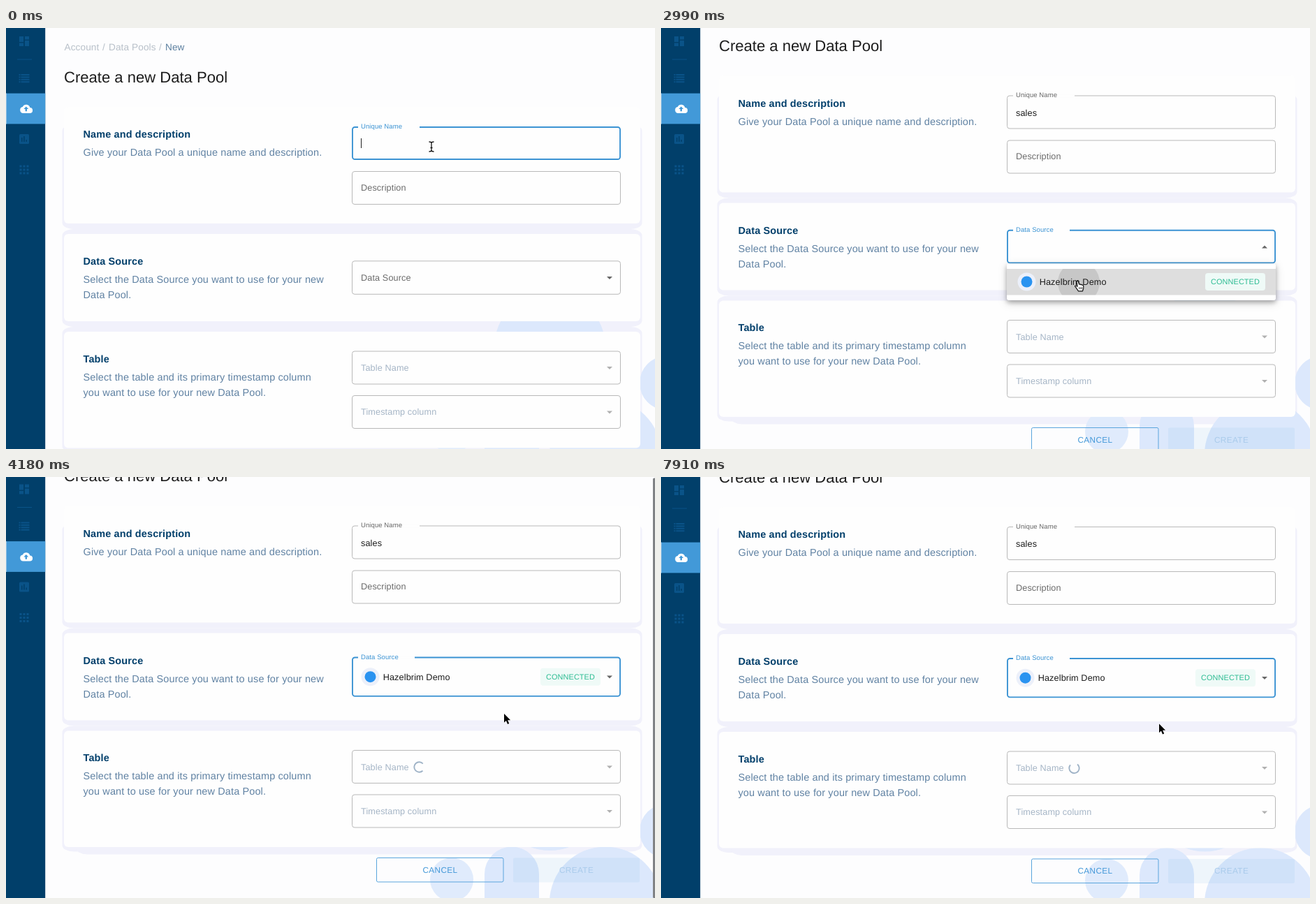
An HTML page that plays this animation: 929x603 px, repeating every 8000 ms.

```html
<!DOCTYPE html>
<html lang="en">
<head>
<meta charset="utf-8">
<title>Create a new Data Pool</title>
<style>
html, body { margin: 0; width: 100%; height: 100%; overflow: hidden; background: #fdfdfe; }
svg { display: block; }
text {
  font: 12.67px "Liberation Sans", Arial, sans-serif; letter-spacing: .12px; fill: #1c1c1c;
  text-rendering: geometricPrecision;
}
.crumb { font-size: 13.58px; fill: #b8c0c9; }
.here { fill: #5b7f9f; }
.title { font-size: 22.05px; letter-spacing: 0; }
.head { font-size: 14.46px; font-weight: bold; letter-spacing: .136px; fill: #023f6b; }
.body { font-size: 14.46px; letter-spacing: .136px; fill: #6082a3; }
.hint { fill: #6b6b6b; }
.off { fill: #a5b5c6; }
.label { font-size: 9.5px; letter-spacing: .09px; fill: #666; }
.active { fill: #3b93d3; }
.chip { font-size: 10.86px; letter-spacing: .13px; fill: #2cbc92; text-anchor: middle; }
.button { font-size: 11.77px; letter-spacing: .4px; fill: #4398d8; text-anchor: middle; }
.disabled { fill: #a9cbeb; }
.menu { filter: drop-shadow(0 3px 3px rgba(0, 0, 0, .25)) drop-shadow(0 3px 6px rgba(0, 0, 0, .18)); }
</style>
</head>
<body>
<svg id="stage" width="929" height="603" viewBox="0 0 929 603"></svg>
<script>
const LOOP = 8000, STEP = 149.2, MAX_SCROLL = 70;
const BLUE = '#3b93d3', GRAY = '#b9b9b9', SHADE = '#f1f1fb', BUBBLE = '#dce8fc';
const SOURCE = 'Hazelbrim Demo';

// Keys are [step, value, ...]
const SCROLL = [[10, 0], [11, 14], [12, 36], [13, 44.5], [23, 44.5], [24, 45.5],
  [25, 71.5], [26, 73], [27, 72.5], [28, 71.5], [29, 70.6], [30, 70]];
const POINTER = [[6, 609, 170], [9, 652, 322], [17, 652, 322], [20, 596, 362],
  [21, 596, 362], [23, 702, 336], [24, 712, 341], [25, 713, 339], [28, 713, 339], [32, 713, 353.5]];

function at(keys, k) {
  if (k <= keys[0][0]) return keys[0].slice(1);
  for (let i = 1; i < keys.length; i++) {
    const a = keys[i - 1], b = keys[i];
    if (k <= b[0]) return a.slice(1).map((v, j) => v + (b[j + 1] - v) * (k - a[0]) / (b[0] - a[0]));
  }
  return keys[keys.length - 1].slice(1);
}

const text = (x, y, str, cls = '') => `<text x="${x}" y="${y}" class="${cls}">${str}</text>`;
const rect = (x, y, w, h, fill, r = 0, more = '') =>
  `<rect x="${x}" y="${y}" width="${w}" height="${h}" rx="${r}" fill="${fill}" ${more}/>`;
const circle = (x, y, r, fill, more = '') => `<circle cx="${x}" cy="${y}" r="${r}" fill="${fill}" ${more}/>`;
const path = (d, fill, more = '') => `<path d="${d}" fill="${fill}" ${more}/>`;
const move = (x, y, content) => `<g transform="translate(${x} ${y})">${content}</g>`;

function sidebar() {
  const ink = '#0a5388';
  let s = rect(0, -10, 56.2, 640, '#013f6a') + rect(0, 93.6, 56.2, 43.8, '#4299d8') + rect(0, 93.6, 1, 43.8, '#8fc0e4');
  s += rect(19, 12, 6, 8, ink) + rect(19, 21.5, 6, 4.5, ink) + rect(27, 12, 6, 4.5, ink) + rect(27, 18, 6, 8, ink);
  s += rect(16, 44.5, 21, 1, ink);
  for (let i = 0; i < 4; i++) s += rect(18.5, 66 + i * 3.4, 2, 2, ink) + rect(21.5, 66 + i * 3.4, 12, 2, ink);
  s += rect(19, 152, 14, 14, ink, 1.5);
  [[22, 157, 6], [25.2, 155, 8], [28.5, 160, 3]].forEach(([x, y, h]) => s += rect(x, y, 1.5, h, '#013f6a'));
  for (let i = 0; i < 9; i++) s += rect(19.5 + i % 3 * 5, 196.5 + (i / 3 | 0) * 5, 3, 3, ink);
  s += path('M24.5 122a4.6 4.6 0 0 1-.6-9.1a5.6 5.6 0 0 1 10.4 1.1a4 4 0 0 1-.4 8z', '#fff');
  return s + path('M28.8 112.5l3.4 3.6h-2.2v3.2h-2.4v-3.2h-2.2z', '#4299d8');
}

function bubbles() {
  return circle(778.5, 457, 79.5, BUBBLE) + circle(946, 508.5, 39, BUBBLE) + circle(858, 611, 80, BUBBLE) +
    circle(638, 578, 31, '#e0ebfc') + rect(685, 531, 78, 120, BUBBLE, 39);
}

function field(y, h, focus, gap) {
  const w = focus ? 1.9 : 1;
  return rect(495 + w / 2, y + w / 2, 385 - w, h - w, 'none', 3.5, `stroke="${focus ? BLUE : GRAY}" stroke-width="${w}"`) +
    (gap ? rect(504, y - 1, gap, 4, '#fefefe') : '');
}

const arrow = (y, fill, up) => path(up ? `M860 ${y + 2}h8l-4-4z` : `M860 ${y - 2}h8l-4 4z`, fill);

const sourceItem = (iconX, textX, chipX, y) =>
  circle(iconX, y, 13, '#ecf0fa') + circle(iconX, y, 8, '#2a93f0') + text(textX, y + 4.5, SOURCE) +
  rect(chipX, y - 12.5, 86, 25, '#effaf7', 4) + text(chipX + 43, y + 3.7, 'CONNECTED', 'chip');

// Wide soft corners meet between the cards and leave a notch at each side
function shadows() {
  const shade = (x, y, w, h) => rect(x, y, w, h, SHADE, 16, 'ry="9"');
  return shade(80.5, 138, 830, 150) + shade(80.5, 288, 830, 140) + shade(80.5, 428, 830, 180) + shade(100, 590, 790, 22);
}

function page(k, time) {
  const open = k >= 17 && k < 21, chosen = k >= 21, nameFocus = k < 17;
  let s = text(83.5, 32, 'Account', 'crumb') + text(138, 32, '/', 'crumb') + text(147, 32, 'Data Pools', 'crumb') +
    text(219, 32, '/', 'crumb') + text(228, 32, 'New', 'crumb here') + text(83, 77.5, 'Create a new Data Pool', 'title');
  s += rect(83, 113, 825, 167, '#fefefe', 6) + rect(83, 295, 825, 125, '#fefefe', 6) + rect(83, 435, 825, 166.5, '#fefefe', 6);

  s += text(110.5, 157, 'Name and description', 'head') +
    text(110.5, 183, 'Give your Data Pool a unique name and description.', 'body') +
    text(110.5, 339, 'Data Source', 'head') +
    text(110.5, 365, 'Select the Data Source you want to use for your new', 'body') +
    text(110.5, 387, 'Data Pool.', 'body') +
    text(110.5, 478.5, 'Table', 'head') +
    text(110.5, 504.5, 'Select the table and its primary timestamp column', 'body') +
    text(110.5, 526.5, 'you want to use for your new Data Pool.', 'body');

  // Name, with typing and caret
  const typed = 'sales'.slice(0, Math.max(0, k - 3));
  const caretX = 508 + [0, 6.5, 13.6, 16.6, 23.7, 30.2][typed.length];
  s += field(141, 48, nameFocus, 88) + text(508, 143.5, 'Unique Name', nameFocus ? 'label active' : 'label') +
    text(508, 170, typed);
  if (k < 2 || k >= 4 && k < 9) s += rect(caretX, 158, 1, 14, '#222');
  s += field(205, 48, false) + text(508, 232.7, 'Description', 'hint');

  // Data source
  if (chosen) {
    s += field(329, 57.3, true, 81) + text(508, 332, 'Data Source', 'label active') +
      sourceItem(521.5, 539.7, 765, 357.7) + arrow(358, '#666');
  } else if (open) {
    s += field(333.3, 48.5, true, 81) + text(508, 336, 'Data Source', 'label active') + arrow(358, '#666', true);
  } else {
    s += field(333.3, 48.5, false) + text(508, 361.7, 'Data Source', 'hint') + arrow(358, '#666');
  }

  // Table
  s += field(462.5, 48, false) + text(508, 491, 'Table Name', 'off') + arrow(487, '#b0b0b0') +
    field(526, 48, false) + text(508, 554.2, 'Timestamp column', 'off') + arrow(550.5, '#b0b0b0');
  if (k >= 22) {
    const turn = 195 + (time - 3590) * .36;
    s += circle(591.5, 487, 7.2, 'none', `stroke="#9fb3c7" stroke-width="1.9" pathLength="360"
      stroke-dasharray="270 90" transform="rotate(${turn} 591.5 487)"`);
  }

  s += rect(530.5, 617, 181.5, 34.5, 'none', 2, 'stroke="#5aa5dd"') + text(621.5, 638.3, 'CANCEL', 'button') +
    rect(726, 617, 181, 35, 'rgba(66,153,216,.08)', 2) + text(816.5, 638.3, 'CREATE', 'button disabled');

  if (open) {
    s += `<g class="menu">${rect(495, 382, 385, 52.5, '#fff', 3)}</g>` +
      rect(495, 389.5, 385, 37.5, k >= 19 ? '#dedede' : '#f0f0f0');
    if (k === 20) s += '<clipPath id="row"><rect x="495" y="389.5" width="385" height="37.5"/></clipPath>' +
      circle(598, 409, 30, 'rgba(0,0,0,.1)', 'clip-path="url(#row)"');
    s += sourceItem(523.5, 541.7, 779, 408);
  }
  return s;
}

function pointer(k) {
  const [x, y] = at(POINTER, k);
  if (k < 8) return move(x, y, path('M-3.5-7q3 0 3.5 1.5q.5-1.5 3.5-1.5M0-5.5v11M-3.5 7q3 0 3.5-1.5q.5 1.5 3.5 1.5M-1.5 1.5h3',
    'none', 'stroke="#111" stroke-width="1.3"'));
  if (k === 8 || k > 24) return move(x, y, path('M0 0v12.8l2.9-2.7l2.1 4.9l2.2-1l-2.1-4.7h4z', '#000',
    'stroke="#fff" stroke-width="1" paint-order="stroke"'));
  return move(x, y, path('M-1 .8q1-1.4 2.2 0l1.3 4.4q1.4-.9 2.2.4q1.4-.7 2.1.6q1.5-.3 1.9 1.2v3.6l-1.2 3.8h-6l-2.9-4.2l-2-2.4q0-1.7 1.8-1l1.6 1z',
    '#fff', 'stroke="#111" stroke-width="1.2" stroke-linejoin="round"') +
    path('M2.7 9.2v3M4.7 9.2v3M6.6 9.2v3', 'none', 'stroke="#111" stroke-width=".8"'));
}

function scrollbar(k, scroll) {
  if (!(k >= 11 && k < 17 || k >= 24 && k < 31)) return '';
  const over = Math.max(0, scroll - MAX_SCROLL);
  return rect(926, over, 4, Math.min(603, 546 + scroll * .86) - over, '#808285', 1.5);
}

const stage = document.getElementById('stage');
let shown = -1;

function frame(now) {
  const k = Math.floor((now % LOOP + 4) / STEP);
  if (k !== shown) {
    shown = k;
    const [scroll] = at(SCROLL, k), bounce = Math.max(0, scroll - MAX_SCROLL);
    stage.innerHTML = rect(0, 0, 929, 603, '#fdfdfe') + move(0, -scroll, shadows()) + move(0, -bounce, bubbles()) +
      move(0, -scroll, page(k, k * STEP)) + move(0, -bounce, sidebar()) + scrollbar(k, scroll) + pointer(k);
  }
  requestAnimationFrame(frame);
}
frame(0);
</script>
</body>
</html>
```
